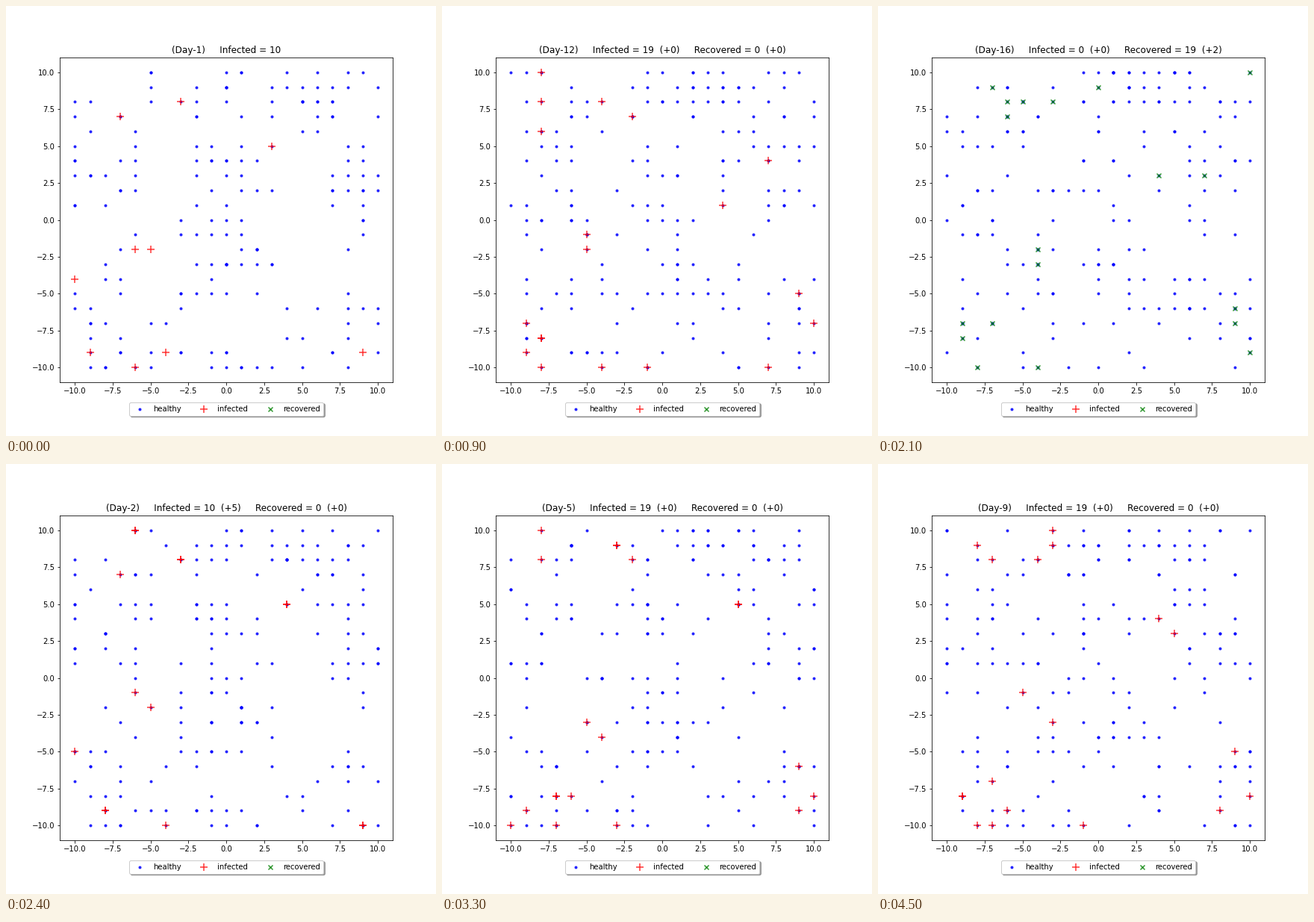
Animation, 576 px wide and 576 px high, one loop 4.8 s. Source, as a matplotlib script:

```python
import numpy as np
import matplotlib.pyplot as plt
from matplotlib.animation import FuncAnimation

LAST_DAY = 16
SIZE = 10                       # the grid runs from -SIZE to SIZE and wraps
PEOPLE = 200
ILLNESS = 12                    # days from infection to recovery
NEW_CASES = {2: 5, 3: 2, 4: 2}
FIRST_CASES = [(-7, 7), (-3, 8), (3, 5), (-6, -2), (-5, -2),
               (-10, -4), (-9, -9), (-6, -10), (-4, -9), (9, -9)]
# empty areas on day 1: centre x, y and radii
GAPS = [(5, -0.5, 1.9, 4.4), (-4, 3, 1.8, 2.9), (1, -7, 2.5, 1.9)]


def wrap(p):
    return (p + SIZE) % (2 * SIZE + 1) - SIZE


def start_cells(rng):
    side = range(-SIZE, SIZE + 1)
    cells = [(x, y) for x in side for y in side
             if all(((x - cx) / rx) ** 2 + ((y - cy) / ry) ** 2 > 1
                    for cx, cy, rx, ry in GAPS)]
    others = rng.choice(cells, PEOPLE - len(FIRST_CASES))
    return np.vstack([FIRST_CASES, others])


def random_walks(rng):
    """Everyone stays or moves one cell a day."""
    moves = np.array([(0, 0), (1, 0), (-1, 0), (0, 1), (0, -1)])
    days = [start_cells(rng)]
    for _ in range(LAST_DAY - 1):
        days.append(wrap(days[-1] + rng.choice(moves, PEOPLE)))
    return days


def spread(days):
    """People in order of infection: those nearest to a case fall ill."""
    cases = list(range(len(FIRST_CASES)))
    for day, count in NEW_CASES.items():
        pos = days[day - 1]
        steps = np.abs(wrap(pos[:, None] - pos[cases])).sum(axis=2)
        order = np.argsort(steps.min(axis=1), kind="stable")
        cases += [p for p in order if p not in cases][:count]
    return cases


def total(day):
    """Everyone infected up to and including the day."""
    if day < 1:
        return 0
    return len(FIRST_CASES) + sum(n for d, n in NEW_CASES.items() if d <= day)


def title(day):
    if day == 1:
        return f"(Day-1)     Infected = {total(1)}"
    healed = total(day - ILLNESS)
    ill = total(day - 1) - healed
    gain = healed - total(day - 1 - ILLNESS)
    return (f"(Day-{day})     Infected = {ill}  (+{NEW_CASES.get(day, 0)})"
            f"     Recovered = {healed}  (+{gain})")


walks = random_walks(np.random.default_rng(19))
cases = spread(walks)
day_order = sorted(range(1, LAST_DAY + 1), key=str)

fig, ax = plt.subplots(figsize=(8, 8), dpi=72)
fig.subplots_adjust(bottom=0.125)
ax.set(xlim=(-11, 11), ylim=(-11, 11))


def layer(color, marker, size, label):
    return ax.scatter([], [], c=color, marker=marker, s=size,
                      alpha=0.8, label=label)


dots = layer("blue", ".", 36, "healthy")
pluses = layer("red", "+", 100, "infected")
crosses = layer("green", "x", 36, "recovered")
ax.legend(loc="upper center", bbox_to_anchor=(0.5, -0.05),
          fancybox=True, shadow=True, ncol=5)
heading = ax.set_title("")


def draw(i):
    day = day_order[i]
    pos = walks[day - 1]
    healed = total(day - ILLNESS)
    # both marks count from the first case, so they overlap late on
    pluses.set_offsets(pos[cases[:total(day) - healed]])
    crosses.set_offsets(pos[cases[:healed]])
    dots.set_offsets(pos[len(FIRST_CASES):] if day == 1 else pos)
    heading.set_text(title(day))
    return dots, pluses, crosses, heading


anim = FuncAnimation(fig, draw, frames=LAST_DAY, interval=300,
                     repeat=True, repeat_delay=0)
plt.show()
```
